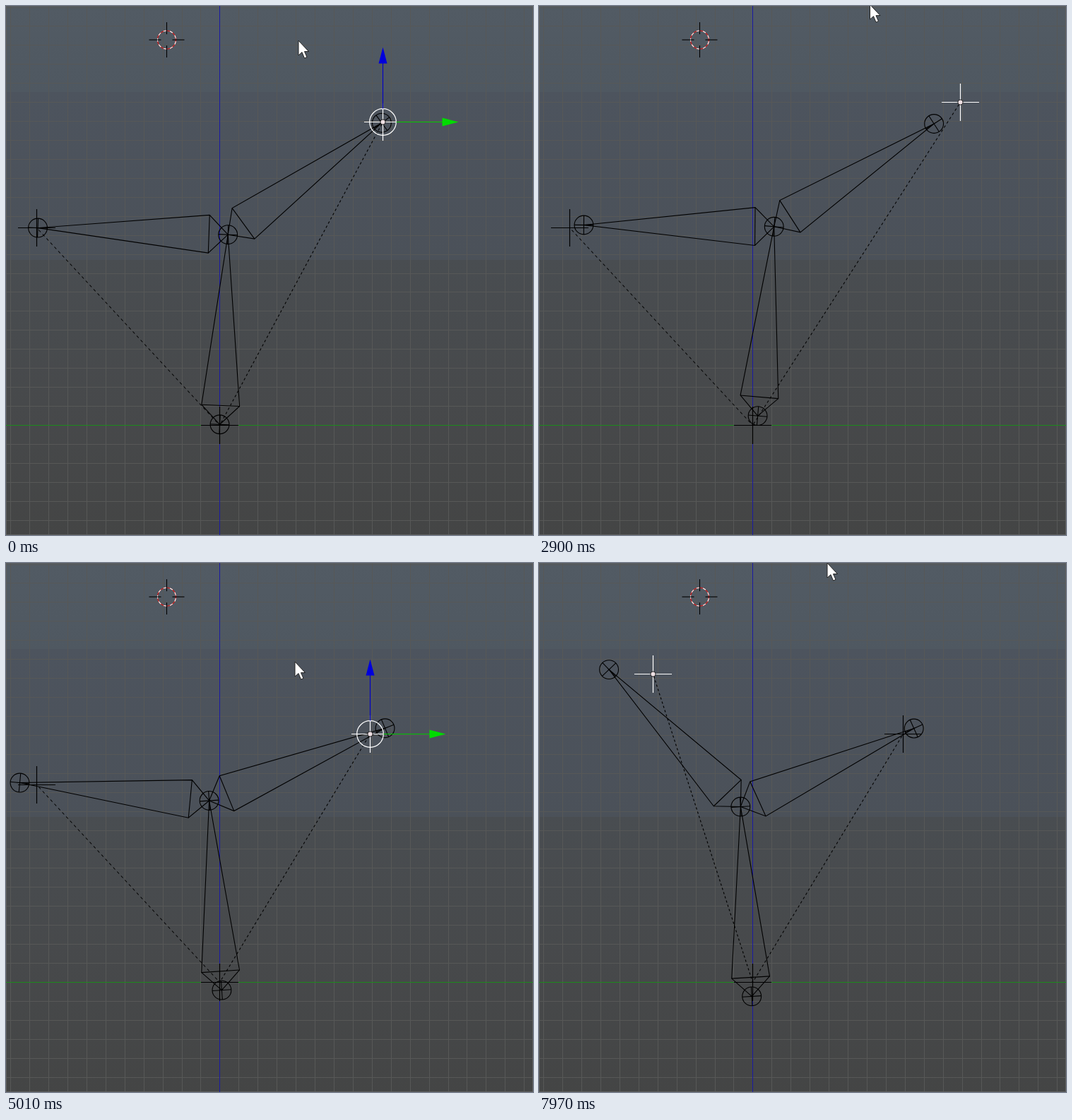
Recreate the animation shown at these times as an HTML page with a canvas. Size 746x750 px, loop 8000 ms.

```html
<!DOCTYPE html>
<html lang="en">
<head>
<meta charset="utf-8">
<title>Bone rig</title>
<style>
html, body { margin: 0; width: 100%; height: 100%; overflow: hidden; background: #494c4f; }
canvas { display: block; }
</style>
</head>
<body>
<canvas id="view" width="746" height="750"></canvas>
<script>
const c = document.getElementById('view').getContext('2d');
const W = 746, H = 750, LOOP = 8000, TICK = 110;
const CELL = 26.93, LEN = CELL * 10, ROOT = [302.5, 594.5];

// Key points: [tick, x, y]
const rightKeys = [
  [8, 533.5, 164.5], [12, 540, 220], [20, 546, 220], [21, 545, 202], [31, 648, 71],
  [35, 465, 125], [38, 488, 168], [39, 511, 219], [42, 517, 280], [44, 515.5, 242.5]
];
const leftKeys = [[63, 43.5, 314.5], [67, 58, 251], [71, 113, 163], [72, 161, 157]];
const mouseKeys = [
  [6, 414, 49], [12, 417, 78], [19, 418, 72], [21, 417, 56], [31, 520, -60], [35, 380, -30],
  [39, 404, 81], [41, 409, 140], [47, 409, 140], [51, 688, 50], [54, 529, 35],
  [58, 60, 308], [62, 291, 157], [67, 305, 94], [71, 360, 8], [72, 408, 0]
];
const GRAB = 8, DROP = 45, PICK = 58, REGRAB = 63;

function at(keys, n) {
  const i = keys.findIndex(k => k[0] > n);
  if (i < 0) return keys[keys.length - 1].slice(1);
  const b = keys[i], a = keys[i - 1] || b;
  const f = (n - a[0]) / (b[0] - a[0] || 1);
  return [a[1] + (b[1] - a[1]) * f, a[2] + (b[2] - a[2]) * f];
}

const goalsAt = n => [ROOT, at(leftKeys, n), at(rightKeys, n)];

// A bone vector from p towards q
function aim(p, q) {
  const dx = q[0] - p[0], dy = q[1] - p[1], k = LEN / Math.hypot(dx, dy);
  return [dx * k, dy * k];
}

const add = (p, v) => [p[0] + v[0], p[1] + v[1]];

// Each goal wants the joint one bone length away; settle on the mean
function relax(joint, goals) {
  const p = goals.map(g => add(g, aim(g, joint)));
  return [0, 1].map(k => (p[0][k] + p[1][k] + p[2][k]) / 3);
}

// The rig makes one relaxation per tick, so it trails its goals
const poses = [];
let joint = [314, 324];
for (let i = 0; i < 40; i++) joint = relax(joint, goalsAt(0));
for (let n = 0; n * TICK < LOOP; n++) {
  const goals = goalsAt(Math.max(0, n - 1)), old = joint;
  joint = relax(old, goals);
  poses.push([joint, ...goals.map(g => add(joint, aim(old, g)))]);
}

function path(points, stroke, width = 1.1) {
  c.beginPath();
  points.forEach(p => c.lineTo(p[0], p[1]));
  c.strokeStyle = stroke;
  c.lineWidth = width;
  c.stroke();
}

function ring([x, y], r, stroke, width = 1.1) {
  c.beginPath();
  c.arc(x, y, r, -Math.PI / 2, Math.PI * 1.5);
  c.strokeStyle = stroke;
  c.lineWidth = width;
  c.stroke();
}

function polygon(points, fill) {
  c.beginPath();
  points.forEach(p => c.lineTo(p[0], p[1]));
  c.fillStyle = fill;
  c.fill();
}

// Runs draw with dashes of the given length, gap first
function dashed(length, draw) {
  c.setLineDash([length, length]);
  c.lineDashOffset = length;
  draw();
  c.setLineDash([]);
}

function background() {
  const g = c.createLinearGradient(0, 0, 0, H);
  [[0, '#525b64'], [.163, '#4f5861'], [.163, '#4d545e'], [.48, '#4b5159'],
   [.48, '#494d51'], [.75, '#47494b'], [1, '#444545']].forEach(s => g.addColorStop(...s));
  c.fillStyle = g;
  c.fillRect(0, 0, W, H);
  c.fillStyle = '#575857';
  for (let x = 302.4 % CELL; x < W; x += CELL) c.fillRect(Math.round(x), 0, 1, H);
  for (let y = 594 % CELL; y < H; y += CELL) c.fillRect(0, Math.round(y), W, 1);
  c.strokeStyle = '#5c5d5c';
  c.lineWidth = 1;
  c.strokeRect(.5, .5, W - 1, H - 1);
  c.fillStyle = '#1c8a1c';
  c.fillRect(0, 594, W, 1);
  c.fillStyle = '#1a1aa2';
  c.fillRect(302, 0, 1, H);
}

function pivot() {
  const x = 227.5, y = 48;
  ring([x, y], 13, '#e01818');
  dashed(4.5, () => ring([x, y], 13, '#fff'));
  for (const s of [-1, 1]) {
    path([[x + s * 8, y], [x + s * 25, y]], '#000');
    path([[x, y + s * 8], [x, y + s * 25]], '#000');
  }
}

function ball(p, from) {
  const a = Math.atan2(p[1] - from[1], p[0] - from[0]), r = 13.4;
  ring(p, r, '#000');
  for (const b of [a, a + Math.PI / 2]) {
    const v = [r * Math.cos(b), r * Math.sin(b)];
    path([add(p, v), [p[0] - v[0], p[1] - v[1]]], '#000');
  }
}

function bone(a, b) {
  const dx = (b[0] - a[0]) / 10, dy = (b[1] - a[1]) / 10;
  const p = add(a, [dx - dy, dy + dx]), q = add(a, [dx + dy, dy - dx]);
  path([a, p, b, q, a], '#000');
  path([p, q], '#000');
}

function cross([x, y], color) {
  path([[x - 26.5, y], [x + 26.5, y]], color, 1.2);
  path([[x, y - 26.5], [x, y + 26.5]], color, 1.2);
}

function tether(p) {
  const dx = Math.abs(p[0] - ROOT[0]), dy = Math.abs(p[1] - ROOT[1]);
  dashed(3 * Math.hypot(dx, dy) / Math.max(dx, dy), () => path([p, ROOT], '#000'));
}

function gizmo([x, y]) {
  ring([x, y], 18.8, '#fff', 1.2);
  path([[x + 19, y], [x + 86, y]], '#00c800');
  polygon([[x + 84, y - 6], [x + 107, y], [x + 84, y + 6]], '#00dc00');
  path([[x, y - 19], [x, y - 86]], '#0000c8');
  polygon([[x - 6, y - 83], [x, y - 106], [x + 6, y - 83]], '#0000dc');
}

function arrow(tip) {
  const shape = [[0, 0], [0, 21], [5, 16.5], [8.5, 25], [12, 23.5], [8.5, 15.5], [14.5, 15.5], [0, 0]]
    .map(p => add(tip, p));
  polygon(shape, '#fff');
  path(shape, '#222', 1);
}

function draw(n) {
  const [left, right] = goalsAt(n).slice(1).map(p => p.map(v => Math.floor(v) + .5));
  const [joint, base, leftEnd, rightEnd] = poses[n];
  const [active, other] = n < PICK ? [right, left] : [left, right];

  background();
  pivot();
  tether(left);
  tether(right);
  bone(base, joint);
  ball(base, joint);
  ball(joint, base);
  for (const end of [leftEnd, rightEnd]) {
    bone(joint, end);
    ball(end, joint);
  }
  cross(ROOT, '#000');
  cross(other, '#000');
  cross(active, '#fff');
  if (n < GRAB || (n >= DROP && n < REGRAB)) gizmo(active);
  c.beginPath();
  c.arc(...active, 3.6, 0, 7);
  c.fillStyle = '#eee0e4';
  c.fill();
  ring(active, 3.6, '#222', 1);
  arrow(at(mouseKeys, n));
}

const start = performance.now();
function frame() {
  draw(Math.floor((performance.now() - start) % LOOP / TICK));
  requestAnimationFrame(frame);
}
frame();
</script>
</body>
</html>
```
